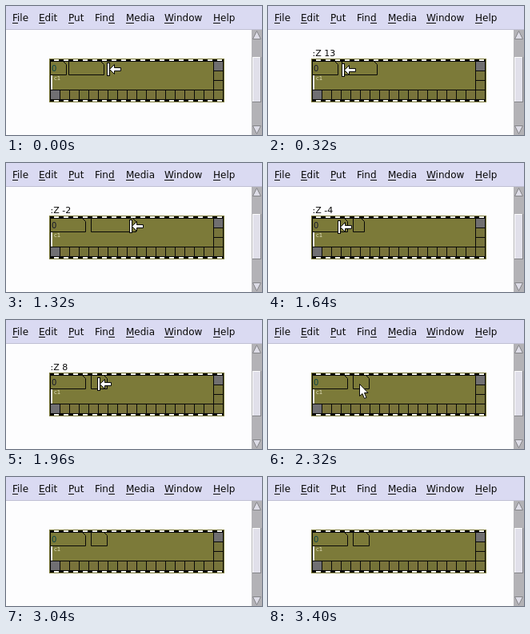
Animation, 320 px wide and 162 px high, one loop 3.44 s. Source, as an HTML page with a canvas:

```html
<!DOCTYPE html>
<html lang="en">
<head>
<meta charset="utf-8">
<title>Patch window</title>
<style>
html, body { margin: 0; width: 100%; height: 100%; overflow: hidden; background: #fdfdfe; }
canvas { display: block; width: 320px; height: 162px; }
</style>
</head>
<body>
<canvas id="stage" width="320" height="162"></canvas>
<script>
const ctx = document.getElementById('stage').getContext('2d');
const LOOP = 3440;
const STEP = 40;
const CHAR = 6;
const EDIT_END = 2160;
const POINTER_END = 2480;
const SANS = '"DejaVu Sans", sans-serif';
const INK = '#080808';
const OLIVE = '#7c7a39';

// label, x, index of the underlined letter
const MENU = [
  ['File', 8, 0], ['Edit', 41, 0], ['Put', 78, 0], ['Find', 111, 3],
  ['Media', 150, 0], ['Window', 198, 0], ['Help', 259, 0]
];

// time, x, y
const POINTER = [
  [0, 127, 79], [120, 80, 80], [160, 80, 80], [320, 93, 80], [440, 142, 81],
  [640, 155, 82], [1200, 157, 80], [1280, 157, 79], [1320, 155, 79],
  [1520, 127, 79], [1600, 92, 80], [1720, 79, 80], [1800, 107, 80],
  [1840, 107, 80], [1960, 115, 80], [2160, 114, 80]
];

// each drag resizes one of the two boxes by whole characters
const START_CHARS = [3, 7];
const DRAGS = [
  { box: 0, from: 160, to: 360 },
  { box: 1, from: 440, to: 760 },
  { box: 1, from: 1280, to: 1560 },
  { box: 0, from: 1600, to: 1760 },
  { box: 1, from: 1840, to: 2040 }
];

function pointerAt(t) {
  const i = POINTER.findIndex(key => key[0] > t);
  if (i < 0) return POINTER[POINTER.length - 1].slice(1);
  const [t0, x0, y0] = POINTER[i - 1], [t1, x1, y1] = POINTER[i];
  const k = (t - t0) / (t1 - t0);
  return [Math.round(x0 + (x1 - x0) * k), Math.round(y0 + (y1 - y0) * k)];
}

function dragOffset(drag, t) {
  return pointerAt(Math.min(t, drag.to))[0] - pointerAt(drag.from)[0];
}

function boxesAt(t) {
  const chars = START_CHARS.slice();
  for (const drag of DRAGS) {
    if (t >= drag.from) chars[drag.box] += Math.trunc(dragOffset(drag, t) / CHAR);
  }
  const second = 57 + chars[0] * 7;
  return [
    { left: 55, right: 57 + chars[0] * CHAR },
    { left: second, right: second + 2 + chars[1] * CHAR }
  ];
}

function rect(x, y, w, h, color) {
  ctx.fillStyle = color;
  ctx.fillRect(x, y, w, h);
}

function text(str, x, y, size, color) {
  ctx.font = size + 'px ' + SANS;
  ctx.fillStyle = color;
  ctx.fillText(str, x, y);
}

function path(points, fill, stroke) {
  ctx.beginPath();
  points.forEach(([x, y]) => ctx.lineTo(x, y));
  ctx.closePath();
  if (fill) {
    ctx.fillStyle = fill;
    ctx.fill();
  }
  ctx.strokeStyle = stroke;
  ctx.lineWidth = 1;
  ctx.stroke();
}

function drawMenu() {
  rect(0, 0, 320, 30, '#dadaf2');
  rect(0, 29, 320, 1, '#c0c0d4');
  for (const [label, x, mark] of MENU) {
    text(label, x, 19, 12, INK);
    const left = ctx.measureText(label.slice(0, mark)).width;
    const width = ctx.measureText(label[mark]).width;
    rect(Math.round(x + left), 21, Math.round(width), 1, INK);
  }
}

function drawScrollbar() {
  rect(307, 30, 13, 132, '#b3b2b6');
  rect(308, 64, 11, 57, '#e1e0ea');
  rect(308, 64, 11, 1, '#ffffff');
  rect(308, 64, 1, 57, '#ffffff');
  rect(308, 120, 11, 1, '#858589');
  rect(318, 64, 1, 57, '#858589');
  path([[313.5, 31.5], [318.5, 41.5], [308.5, 41.5]], '#dddce6', '#858589');
  path([[308.5, 150.5], [318.5, 150.5], [313.5, 160.5]], '#dddce6', '#858589');
}

function cell(x, y, color) {
  rect(x, y, 13, 13, INK);
  rect(x + 1, y + 1, 11, 11, color);
}

function dashes(y) {
  for (let x = 60; x < 270; x += 12) rect(x, y, 6, 2, '#f8f8f0');
}

function drawPanel() {
  rect(54, 66, 219, 55, OLIVE);
  rect(55, 67, 217, 53, INK);
  rect(56, 70, 215, 48, OLIVE);
  for (let i = 0; i < 17; i++) {
    cell(55 + i * 12, 105, i ? (i % 3 ? '#79733b' : '#747338') : '#706f73');
  }
  for (let i = 0; i < 4; i++) cell(259, 69 + i * 12, i ? '#77743b' : '#706f70');
  dashes(67);
  dashes(118);
  rect(56, 86, 2, 19, '#f4f4ee');
}

function drawBox({ left, right }) {
  path([[left + .5, 69.5], [right - 3.5, 69.5], [right + .5, 73.5],
        [right + .5, 86.5], [left + .5, 86.5]], null, INK);
}

function resizePointer(x, y) {
  rect(x - 1, y - 8, 4, 17, INK);
  rect(x, y - 7, 2, 15, '#ffffff');
  path([[x + 2.5, y + .5], [x + 8.5, y - 5.5], [x + 8.5, y - 1.5], [x + 16.5, y - 1.5],
        [x + 16.5, y + 2.5], [x + 8.5, y + 2.5], [x + 8.5, y + 6.5]], '#ffffff', INK);
}

function arrowPointer(x, y) {
  const shape = [[0, 0], [0, 15], [3.5, 12], [6, 18], [8.5, 17], [6, 11], [10.5, 11]];
  path(shape.map(([dx, dy]) => [x + dx + .5, y + dy + .5]), '#ffffff', INK);
}

function draw(t) {
  const boxes = boxesAt(t);
  const drag = DRAGS.find(d => t >= d.from && t < d.to);
  const [x, y] = pointerAt(t);

  rect(0, 0, 320, 162, '#fdfdfe');
  drawMenu();
  drawScrollbar();
  drawPanel();
  boxes.forEach(drawBox);
  text('0', 57, 82, 10, drag ? '#15172c' : '#0c4448');
  text('c1', 60, 93, 7, '#e2e0bd');
  if (drag) text(':Z ' + dragOffset(drag, t), 55.5, 63, 11, INK);

  const onEdge = boxes.some(box => Math.abs(x - box.right) < 10);
  if (t < EDIT_END && (drag || onEdge)) resizePointer(x, y);
  else if (t < POINTER_END) arrowPointer(x, y);
}

function tick() {
  const t = performance.now() % LOOP;
  draw(Math.floor(t / STEP) * STEP);
  requestAnimationFrame(tick);
}
tick();
</script>
</body>
</html>
```
